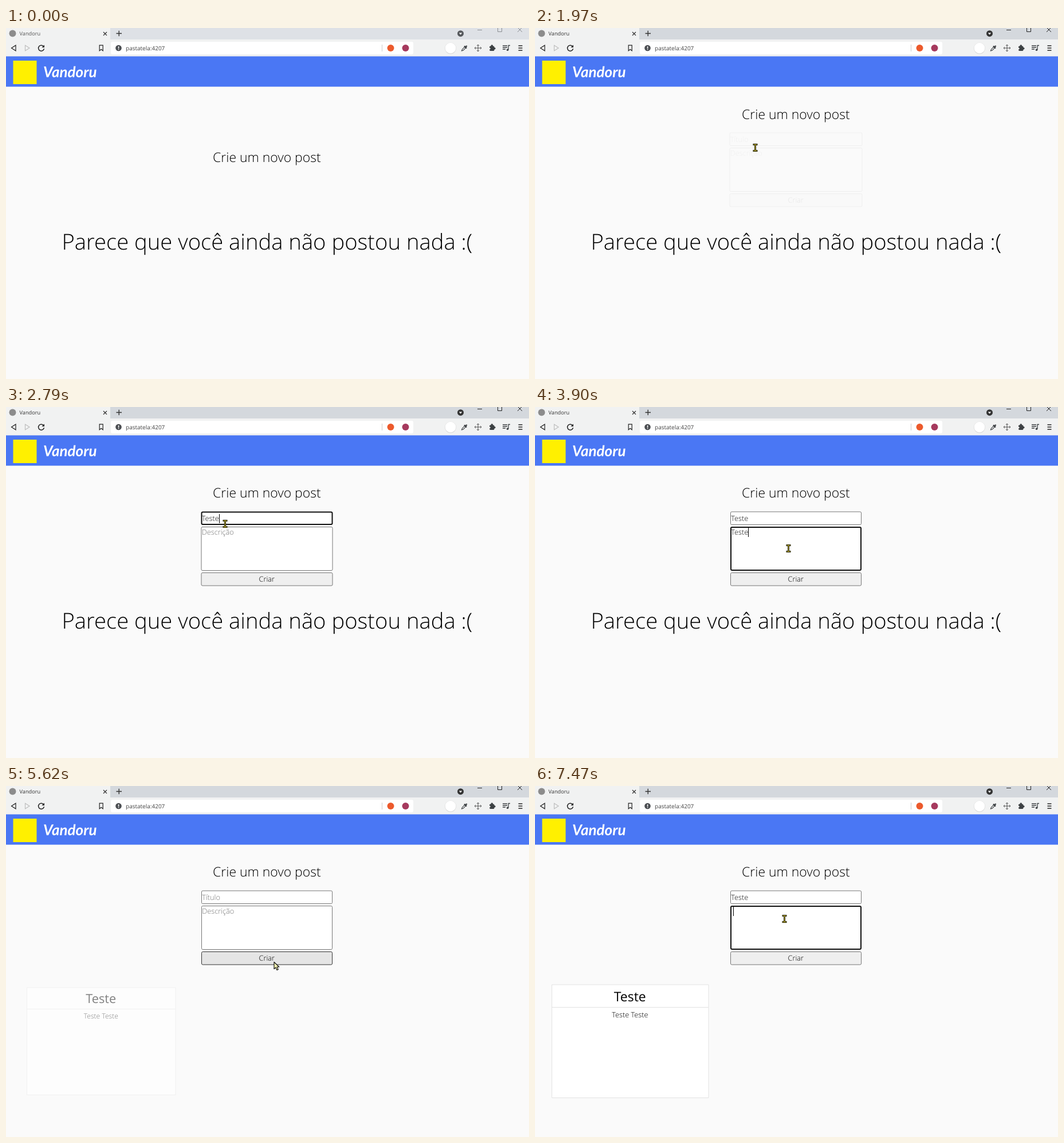
Write an HTML page with a canvas that moves like this. It is 913x613 px and loops after 8 s.

```html
<!DOCTYPE html>
<html lang="pt">
<head>
<meta charset="utf-8">
<style>
html, body { margin: 0; width: 100%; height: 100%; overflow: hidden; background: #fafafa; }
canvas { display: block; }
</style>
</head>
<body>
<canvas id="stage" width="913" height="613"></canvas>
<script>
const ctx = document.getElementById('stage').getContext('2d');
const LOOP = 8000, SUBMIT = 5330;
const HUGE = 38.2, LARGE = 22.95, SMALL = 12.75;
const clamp = v => Math.max(0, Math.min(1, v));
const progress = (t, start, length) => clamp((t - start) / length);

// Linear interpolation over rows of [time, ...values]
function track(rows, t) {
  const next = rows.findIndex(row => row[0] > t);
  if (next < 0) return rows[rows.length - 1].slice(1);
  if (next === 0) return rows[0].slice(1);
  const a = rows[next - 1], b = rows[next], k = (t - a[0]) / (b[0] - a[0]);
  return a.slice(1).map((v, i) => v + (b[i + 1] - v) * k);
}

const cursorPath = [
  [200, 783, 599], [270, 721, 581], [340, 651, 555], [540, 508, 494], [700, 482, 420],
  [950, 432, 336], [1010, 425, 310], [1350, 404, 217], [1550, 404, 217], [1970, 384.5, 209],
  [2320, 382.5, 204], [3260, 382.5, 204], [3680, 442.5, 247], [4620, 442.5, 247], [4950, 470, 278],
  [5200, 467, 307], [5700, 467, 307], [6250, 438, 217], [6580, 424.5, 203], [7250, 424.5, 203],
  [7470, 435.5, 232]
];
const formWidth = [[1940, 229], [1970, 232], [2200, 250], [2390, 250], [2600, 236], [2790, 230], [3100, 229]];
const cardScale = [[5390, .5], [5500, .82], [5620, .948], [5740, .995], [5860, 1.01], [6280, 1]];

function text(str, x, y, size, { color = '#000', align = 'left', font = '300', family = 'Open Sans' } = {}) {
  ctx.font = `${font} ${size}px "${family}", sans-serif`;
  ctx.fillStyle = color;
  ctx.textAlign = align;
  ctx.fillText(str, x, y);
}
function rect(x, y, w, h, color) {
  ctx.fillStyle = color;
  ctx.fillRect(x, y, w, h);
}
function disc(x, y, r, color) {
  ctx.fillStyle = color;
  ctx.beginPath();
  ctx.arc(x, y, r, 0, 7);
  ctx.fill();
}
function box(x, y, w, h, fill, stroke, line = 1, radius = 2) {
  ctx.beginPath();
  ctx.roundRect(x, y, w, h, radius);
  ctx.fillStyle = fill;
  ctx.fill();
  ctx.strokeStyle = stroke;
  ctx.lineWidth = line;
  ctx.stroke();
}
function path(d, color, width = 1.2, fill) {
  const shape = new Path2D(d);
  if (fill) { ctx.fillStyle = fill; ctx.fill(shape); }
  if (!color) return;
  ctx.strokeStyle = color;
  ctx.lineWidth = width;
  ctx.stroke(shape);
}

function browser(active) {
  const ink = '#3c4043', control = active ? '#222' : '#8b8e92';
  rect(0, 0, 913, 20, active ? '#d4d8dd' : '#dee1e6');
  rect(0, 0, 182, 20, '#f1f2f2');
  rect(0, 20, 913, 30, '#f1f2f2');
  disc(11.5, 9.5, 6, '#8c8c8c');
  text('Vandoru', 23.5, 13, 9.2, { color: active ? '#333' : '#555', font: '400' });
  path('M170 7l6 6M176 7l-6 6', '#333', 1.2);
  path('M192.5 9.5h9.5M197.25 4.8v9.5', '#333', 1.4);
  disc(793.5, 9.7, 5.5, active ? '#333' : '#55585c');
  path('M790.8 8.4h5.4l-2.7 3.4z', null, 1, '#fff');
  path('M823 3.5h8M858.5 -2.5h7v9h-7zM893 -1l8 8M901 -1l-8 8', control, 1);

  path('M17 30.2v9.6l-7.5-4.8z', '#222', 1.2);
  path('M33.5 30.2v9.6l7.5-4.8z', '#bbb', 1.1);
  path('M65.8 32.4a5 5 0 1 0 .7 3.8', '#222', 1.5);
  path('M67 29.5v4.5h-4.5z', null, 1, '#222');
  path('M163.2 30.2h6v9.6l-3-2.6-3 2.6z', '#222', 1.2);
  box(183.5, 24.5, 527, 21, '#fff', '#fff');
  disc(196.5, 35, 5.3, '#4b4e52');
  rect(195.8, 32, 1.5, 3.8, '#fff');
  rect(195.8, 36.7, 1.5, 1.5, '#fff');
  text('pastatela:4207', 209, 38.5, 10, { color: '#444', font: '400' });
  rect(656, 29, 1, 12, '#ccc');
  disc(671.5, 35, 6, '#ec5a2c');
  disc(697.5, 35, 6, '#a63a5e');

  disc(776, 35.6, 10, '#ddd');
  disc(776, 35, 9.3, '#fff');
  path('M795.5 39.8l1-2.6 4.2-4.2 1.8 1.8-4.2 4.2z', ink, 1.1);
  path('M800 31.5l4 4M802.2 33.4l2.4-2.4', ink, 2.4);
  path('M818.5 35h11M824 29.5v11M822 31l2-2 2 2M822 39l2 2 2-2M820 33l-2 2 2 2M828 33l2 2-2 2', '#555', 1);
  box(844.5, 32, 7.5, 7.5, ink, ink, 1, 1);
  disc(848.3, 31, 1.8, ink);
  disc(852.8, 35.8, 1.8, ink);
  disc(844.3, 36, 1.4, '#f1f2f2');
  path('M867 31h8M867 34h8M867 37h5M877 38v-7.5h3', ink, 1.3);
  disc(875.6, 38.2, 1.8, ink);
  path('M894.5 31h7M894.5 35h7M894.5 39h7', '#222', 1.4);

  rect(0, 49.5, 913, 53, '#4a77f4');
  rect(12.5, 57, 41, 41, '#fff000');
  text('Vandoru', 65, 86, 26, { color: '#fff', font: 'italic 700', family: 'Lato' });
}

function titleValue(t) {
  if (t < SUBMIT) return 'Teste'.slice(0, Math.max(0, (t - 2430) / 70));
  return 'Teste'.slice(0, Math.max(0, (t - 6850) / 70));
}
function descriptionValue(t) {
  if (t >= 7470) return ' ';
  if (t < 3900 || t >= SUBMIT) return '';
  if (t < 4290) return 'Teste';
  return 'Teste ' + 'Teste'.slice(0, Math.max(0, (t - 4550) / 70));
}

function field(x, y, w, h, value, hint, focused, hovered) {
  if (focused) box(x + 1, y + 1, w - 2, h - 2, '#fff', '#101010', 2);
  else box(x + .5, y + .5, w - 1, h - 1, '#fff', hovered ? '#333' : '#767676');
  const left = x + 1.2, base = y + (h > 30 ? 14 : 16.5);
  text(value || hint, left, base, SMALL, { color: value ? '#111' : '#757575' });
  if (focused) rect(Math.round(left + (value ? ctx.measureText(value).width : .5)), base - 12, 1, 16, '#000');
}

function form(t, cx, cy) {
  const [w] = track(formWidth, t), x = 455.5 - w / 2;
  const inTitle = t >= 2390 && t < 3400 || t >= 6650 && t < 7400;
  const inDescription = t >= 3400 && t < 5250 || t >= 7400;
  const overButton = t > 4900 && cy >= 289 && cy <= 312;
  ctx.globalAlpha = progress(t, 1940, 370);
  field(x, 182.5, w, 23.5, titleValue(t), 'Título', inTitle, t > 2000 && cy < 206);
  field(x, 209, w, 77, descriptionValue(t), 'Descrição', inDescription, cy > 209 && cy < 286);
  box(x + .5, 289.5, w - 1, 22.5, overButton ? '#e5e5e5' : '#efefef', overButton ? '#333' : '#767676');
  text('Criar', 455.3, 305.3, SMALL, { align: 'center' });
  ctx.globalAlpha = 1;
}

function card(t) {
  const [scale] = track(cardScale, t);
  ctx.save();
  ctx.globalAlpha = progress(t, 5410, 430);
  ctx.translate(166.2, 445.7);
  ctx.scale(scale, scale);
  box(-136.7, -98.7, 273.5, 197.5, '#fff', '#e2e2e2', 1, 0);
  rect(-136.5, -59.7, 273, 1, '#e2e2e2');
  text('Teste', -.5, -70, LARGE, { align: 'center', font: '400' });
  text('Teste Teste', -.4, -42, SMALL, { align: 'center' });
  ctx.restore();
}

function cursor(t, x, y) {
  ctx.save();
  ctx.translate(x, y);
  if (t > 1930 && y > 183 && y < 286) {
    const beam = 'M-4 -5.5h8M0 -5.5v11M-4 5.5h8';
    path(beam, '#1c1c08', 3);
    path('M-3.2 -5.5h6.4M0 -5.5v11M-3.2 5.5h6.4', '#c2b02c', 1.1);
  } else {
    ctx.lineJoin = 'round';
    path('M1 .5v12l2.8-2.6 2.2 4.6 2.2-1-2.2-4.5h3.8z', '#111', 1.2, '#ffffb4');
  }
  ctx.restore();
}

function draw(t) {
  rect(0, 0, 913, 613, '#fafafa');
  browser(t >= 1550);
  const [cx, cy] = track(cursorPath, t);
  const rise = 1 - (1 - progress(t, 1550, 550)) ** 3;
  text('Crie um novo post', 455.3, 234 - 76 * rise, LARGE, { align: 'center' });
  if (t >= 1940) form(t, cx, cy);
  if (t < 5390) text('Parece que você ainda não postou nada :(', 455.7, 387.3, HUGE, { align: 'center' });
  else card(t);
  if (t >= 200) cursor(t, cx, cy);
}

ctx.textRendering = 'geometricPrecision';
function tick() {
  draw(performance.now() % LOOP);
  requestAnimationFrame(tick);
}
tick();
</script>
</body>
</html>
```
